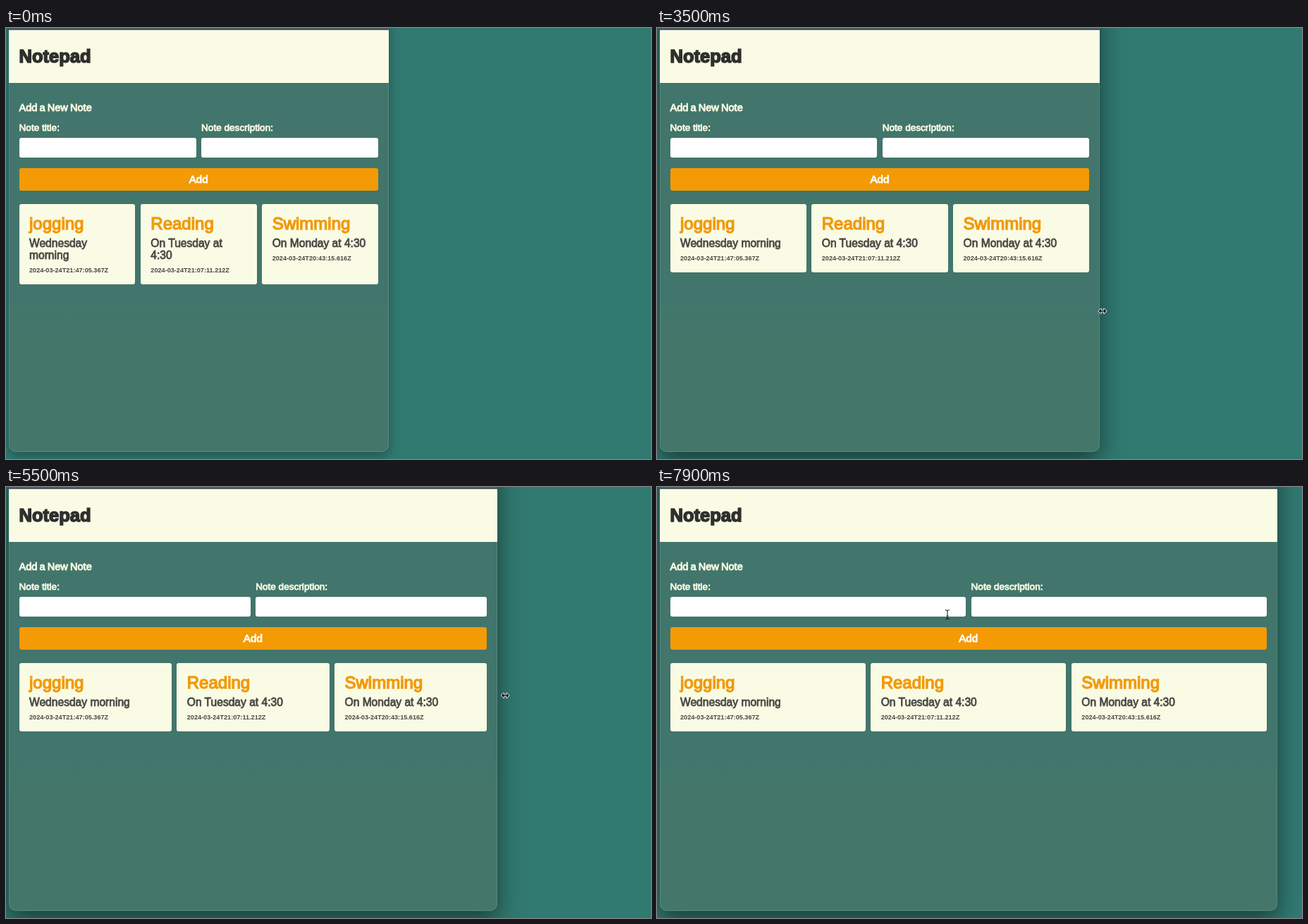
An HTML page for the animation above (8 s loop, 915 by 612 pixels).

```html
<!DOCTYPE html>
<html lang="en">
<head>
<meta charset="utf-8">
<title>Notepad</title>
<style>
  @property --edge { syntax: "<length>"; inherits: true; initial-value: 543px; }
  @property --lag { syntax: "<length>"; inherits: true; initial-value: 0px; }
  @property --y { syntax: "<length>"; inherits: true; initial-value: 0px; }

  html, body { margin: 0; width: 100%; height: 100%; overflow: hidden; }
  body {
    position: relative;
    background: #317a71;
    font-family: "Liberation Sans", Arial, sans-serif;
    color: #fafbe4;
    animation: drag 8s linear infinite;
  }
  .window {
    position: absolute; left: 4px; top: -40px; height: 642px;
    width: calc(var(--edge) - 4px);
    overflow: hidden; border-radius: 10px;
    background: linear-gradient(#42756c 430px, #44776a 470px);
    animation: focus 8s step-end infinite;
  }
  .window::after {
    content: ""; position: absolute; inset: 118px 0 0;
    border: 1px solid rgba(190, 225, 205, .17); border-top: 0;
    border-radius: 0 0 10px 10px;
  }
  .bar { height: 43px; background: #4b5a66; }
  header { height: 75px; background: #fafbe4; }
  h1, h2, h3, p { margin: 0; font-weight: 400; }
  h1 {
    padding: 22.2px 0 0 14.5px;
    font-size: 25.5px; line-height: 30px; font-weight: 700;
    color: #2f2f2d; -webkit-text-stroke: 1.6px;
  }
  main { position: absolute; left: 14.5px; right: 15px; top: 40px; }
  main > * { position: absolute; left: 0; right: 0; }
  h2 {
    top: 103.3px; font-size: 14.6px; line-height: 20px; word-spacing: -1px;
    white-space: nowrap; -webkit-text-stroke: .9px;
  }
  .fields, .notes { display: grid; gap: 7.5px; }
  .fields { top: 133.3px; grid-template-columns: 1fr 1fr; }
  .fields span {
    display: block; font-size: 13.6px; line-height: 18px;
    white-space: nowrap; -webkit-text-stroke: .8px;
  }
  .fields i { display: block; margin-top: 4.7px; height: 28.5px; border-radius: 3px; background: #fff; }
  .add {
    top: 199px; height: 32px; border-radius: 3px; background: #f39a05;
    color: #fff; text-align: center; font-size: 15.2px; line-height: 32px;
    -webkit-text-stroke: .9px;
  }
  .notes { top: 249.5px; grid-template-columns: repeat(3, minmax(0, 1fr)); }
  .note { padding: 14.2px 14.5px 14px; border-radius: 3px; background: #fafbe4; color: #484844; }
  h3 { font-size: 24px; line-height: 28px; color: #f19a0b; -webkit-text-stroke: 1.4px; }
  .note p { margin-top: 5.4px; font-size: 15.6px; line-height: 17px; -webkit-text-stroke: .8px; }
  .note time {
    display: block; margin-top: 7.2px;
    font-size: 9.15px; line-height: 12px; font-weight: 700; white-space: nowrap;
  }
  /* The pointer trails or leads the dragged edge by --lag. */
  .cursor {
    position: absolute; left: 0; top: 0; overflow: visible;
    transform: translate(calc(var(--edge) + var(--lag)), var(--y));
    animation: point 8s linear infinite;
  }
  .cursor path {
    fill: #111; stroke: #fff; stroke-width: 1.5;
    paint-order: stroke; stroke-linejoin: round;
    animation: 8s step-end infinite;
  }
  .cursor .resize { animation-name: resize; }
  .cursor .arrow { animation-name: arrow; }
  .cursor .text { animation-name: text; fill: none; stroke: #222; stroke-width: 1.1; }

  @keyframes drag {
    0%, 32.5% { --edge: 543px; }
    37.5% { --edge: 505px; animation-timing-function: ease-in; }
    48.75% { --edge: 831px; animation-timing-function: ease-out; }
    53.25% { --edge: 898px; animation-timing-function: ease-in; }
    57.5% { --edge: 758px; animation-timing-function: ease-out; }
    63% { --edge: 546px; }
    68.75% { --edge: 697px; }
    75% { --edge: 826px; animation-timing-function: ease-out; }
    82.5% { --edge: 878.6px; }
    86.25%, 100% { --edge: 880px; }
  }
  @keyframes point {
    0%, 23.75% { --lag: -65px; --y: 330px; }
    28.75%, 41.25% { --lag: 2px; --y: 413px; }
    48.75% { --lag: 7px; --y: 380px; }
    57.5% { --lag: -33px; --y: 346px; }
    68.75% { --lag: 11px; --y: 296px; }
    82.5%, 87.5% { --lag: 0px; --y: 285px; }
    95% { --lag: -528px; --y: 150px; animation-timing-function: ease-out; }
    98.75%, 100% { --lag: -468px; --y: 181px; }
  }
  @keyframes focus {
    0% { box-shadow: 0 6px 16px rgba(0, 0, 0, .3); }
    31.25%, 100% { box-shadow: 0 13px 35px rgba(0, 0, 0, .5); }
  }
  @keyframes resize {
    0%, 87.5% { visibility: hidden; }
    28.75% { visibility: visible; }
  }
  @keyframes arrow {
    0%, 28.75%, 96.25% { visibility: hidden; }
    23.75%, 87.5% { visibility: visible; }
  }
  @keyframes text {
    0% { visibility: hidden; }
    96.25%, 100% { visibility: visible; }
  }
</style>
</head>
<body>
<div class="window">
  <div class="bar"></div>
  <header><h1>Notepad</h1></header>
  <main>
    <h2>Add a New Note</h2>
    <div class="fields">
      <div><span>Note title:</span><i></i></div>
      <div><span>Note description:</span><i></i></div>
    </div>
    <div class="add">Add</div>
    <div class="notes">
      <div class="note"><h3>jogging</h3><p>Wednesday morning</p><time>2024-03-24T21:47:05.367Z</time></div>
      <div class="note"><h3>Reading</h3><p>On Tuesday at 4:30</p><time>2024-03-24T21:07:11.212Z</time></div>
      <div class="note"><h3>Swimming</h3><p>On Monday at 4:30</p><time>2024-03-24T20:43:15.616Z</time></div>
    </div>
  </main>
</div>
<svg class="cursor" width="1" height="1">
  <path class="resize" d="M-5.5 0L-2-3.4V-.8H2V-3.4L5.5 0L2 3.4V.8H-2V3.4Z"/>
  <path class="arrow" d="M0 0V12L2.8 9.4L4.6 13.4L6.4 12.6L4.7 8.7H8.4Z"/>
  <path class="text" d="M-3-6.5Q0-6.5 0-4.5Q0-6.5 3-6.5M0-4.5V4.5M-3 6.5Q0 6.5 0 4.5Q0 6.5 3 6.5M-1.5 2H1.5"/>
</svg>
</body>
</html>
```
